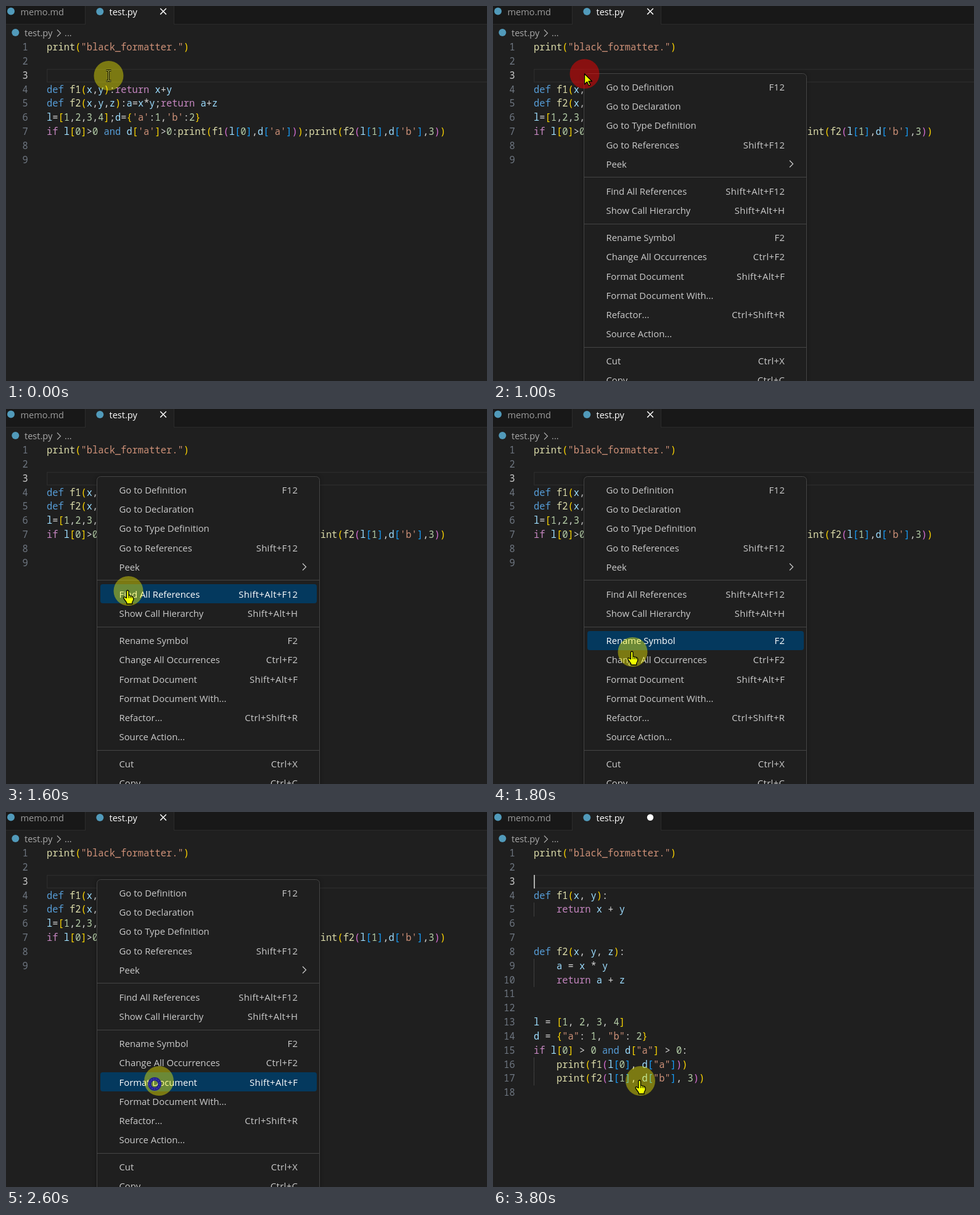
Animation, 780 px wide and 608 px high, one loop 4200 ms. Source, as an HTML page:

```html
<!DOCTYPE html>
<html lang="en">
<head>
<meta charset="utf-8">
<title>Formatting code from the context menu</title>
<style>
html, body { margin: 0; width: 100%; height: 100%; overflow: hidden; background: #1f1f1f; }
svg { display: block; }
text { white-space: pre; }
.ui { font: 14.6px "Open Sans", "Noto Sans", sans-serif; }
.menu .ui { font-size: 14.85px; }
.menu .keys { letter-spacing: .36px; }
.code { font: 15.405px "Noto Sans Mono", "DejaVu Sans Mono", monospace; font-variant-ligatures: none; }
</style>
</head>
<body>
<svg id="stage" width="780" height="608" viewBox="0 0 780 608"></svg>
<script>
const LOOP = 4200;
const CHAR = 9.243;
const LINE = 22.82;
const LEFT = 66;
const baseline = n => 72.2 + (n - 1) * LINE;

const RAW = `print("black_formatter.")


def f1(x,y):return x+y
def f2(x,y,z):a=x*y;return a+z
l=[1,2,3,4];d={'a':1,'b':2}
if l[0]>0 and d['a']>0:print(f1(l[0],d['a']));print(f2(l[1],d['b'],3))

`;
const TIDY = `print("black_formatter.")


def f1(x, y):
    return x + y


def f2(x, y, z):
    a = x * y
    return a + z


l = [1, 2, 3, 4]
d = {"a": 1, "b": 2}
if l[0] > 0 and d["a"] > 0:
    print(f1(l[0], d["a"]))
    print(f2(l[1], d["b"], 3))
`;

// label, shortcut, row centre
const ITEMS = [
  ["Go to Definition", "F12", 131],
  ["Go to Declaration", "", 162],
  ["Go to Type Definition", "", 193.5],
  ["Go to References", "Shift+F12", 225],
  ["Peek", "", 256],
  ["Find All References", "Shift+Alt+F12", 300],
  ["Show Call Hierarchy", "Shift+Alt+H", 331],
  ["Rename Symbol", "F2", 375.5],
  ["Change All Occurrences", "Ctrl+F2", 406.5],
  ["Format Document", "Shift+Alt+F", 438],
  ["Format Document With...", "", 469],
  ["Refactor...", "Ctrl+Shift+R", 500],
  ["Source Action...", "", 531.5],
  ["Cut", "Ctrl+X", 575.5],
  ["Copy", "Ctrl+C", 606.5]
];

const HALO = {
  idle: "rgba(255,250,0,.41)",
  left: "rgba(255,155,0,.49)",
  right: "rgba(255,0,0,.47)"
};

// start, x, y, halo, pointer, highlighted row
const STEPS = [
  [0, 166.5, 113, "idle", "beam", -1],
  [200, 148.5, 111.5, "idle", "beam", -1],
  [400, 148.5, 110, "idle", "beam", -1],
  [800, 148.5, 110, "idle", "busy", -1],
  [1000, 148.5, 110, "right", "arrow", -1],
  [1200, 148.5, 110, "idle", "arrow", -1],
  [1400, 198.5, 270, "idle", "hand", 3],
  [1600, 198.5, 295, "idle", "hand", 5],
  [1800, 226.5, 394, "idle", "hand", 7],
  [2000, 238.5, 423, "idle", "hand", 9],
  [2200, 248, 436, "idle", "hand", 9],
  [2600, 248, 436, "idle", "wait", 9],
  [2800, 239, 436, "left", "hand", -1],
  [3000, 239, 436, "idle", "hand", -1]
];
const MENU = [1000, 2800];
const CARET = [[600, 800], [2800, 3200], [3800, LOOP]];

const stage = document.getElementById("stage");

function add(parent, tag, attrs = {}, text) {
  const el = document.createElementNS("http://www.w3.org/2000/svg", tag);
  for (const key in attrs) el.setAttribute(key, attrs[key]);
  if (text !== undefined) el.textContent = text;
  parent.appendChild(el);
  return el;
}
const group = (parent, attrs) => add(parent, "g", attrs);
const box = (parent, x, y, width, height, fill, rx = 0) =>
  add(parent, "rect", { x, y, width, height, fill, rx });
const label = (parent, x, y, text, fill) =>
  add(parent, "text", { x, y, fill, class: "ui" }, text);
const dot = (parent, cx, cy, r, fill) => add(parent, "circle", { cx, cy, r, fill });
const stroke = (parent, d, color, width = 1) =>
  add(parent, "path", { d, fill: "none", stroke: color, "stroke-width": width });
const show = (el, on) => el.setAttribute("visibility", on ? "visible" : "hidden");
const within = (t, [from, to]) => t >= from && t < to;

function tokens(line) {
  const levels = ["#ffd700", "#da70d6", "#179fff"];
  const parts = line.match(/"[^"]*"|'[^']*'|\w+|\s+|./g) || [];
  let depth = 0;
  return parts.map((part, i) => {
    let color = "#d4d4d4";
    if (/^["']/.test(part)) color = "#ce9178";
    else if (/^[([{]$/.test(part)) color = levels[depth++ % 3];
    else if (/^[)\]}]$/.test(part)) color = levels[--depth % 3];
    else if (/^(def|and)$/.test(part)) color = "#569cd6";
    else if (/^(return|if)$/.test(part)) color = "#c586c0";
    else if (/^\d/.test(part)) color = "#b5cea8";
    else if (/^\w/.test(part)) color = parts[i + 1] === "(" ? "#dcdcaa" : "#9cdcfe";
    return [part, color];
  });
}

function drawCode(source) {
  const g = group(stage, { class: "code" });
  source.split("\n").forEach((line, i) => {
    const n = i + 1;
    const y = baseline(n);
    add(g, "text", {
      x: 35.7, y, "text-anchor": "end", fill: n === 3 ? "#cccccc" : "#6e7681"
    }, n);
    if (line.startsWith("    ")) box(g, LEFT, y - 16.7, 1, LINE, "#404040");
    let col = 0;
    for (const [part, fill] of tokens(line)) {
      if (part.trim()) add(g, "text", { x: LEFT + col * CHAR, y, fill }, part);
      col += part.length;
    }
  });
  return g;
}

function drawFrame() {
  box(stage, 0, 0, 780, 608, "#1f1f1f");
  box(stage, 0, 0, 780, 29, "#181818");
  box(stage, 0, 29, 780, 1, "#2b2b2b");
  box(stage, 128, 0, 145, 30, "#2b2b2b");
  box(stage, 129, 0, 143, 30, "#1f1f1f");
  dot(stage, 8, 8.5, 6, "#519aba");
  label(stage, 23.5, 15, "memo.md", "#9d9d9d");
  dot(stage, 152.3, 9, 6, "#519aba");
  label(stage, 167.5, 15, "test.py", "#ffffff");
  dot(stage, 15.3, 43, 6, "#519aba");
  label(stage, 30, 49, "test.py", "#a9a9a9");
  stroke(stage, "M83 38.5l5.5 5.5-5.5 5.5", "#a9a9a9", 1.2);
  label(stage, 95, 49, "...", "#a9a9a9");
  add(stage, "rect", {
    x: 66.7, y: 102.7, width: 730, height: 20.6,
    fill: "none", stroke: "#2a2a2a", "stroke-width": 1.5
  });
}

function drawMenu() {
  const g = group(stage, {
    class: "menu", style: "filter: drop-shadow(0 0 3px rgba(0,0,0,.36))"
  });
  add(g, "rect", {
    x: 147.5, y: 109.5, width: 361, height: 540, rx: 6, fill: "#1f1f1f", stroke: "#454545"
  });
  for (const y of [277, 353, 553]) box(g, 148, y, 360, 1, "#454545");
  const bar = box(g, 153, 0, 351, 31, "#04395e", 4);
  const rows = ITEMS.map(([name, keys, y]) => {
    const row = group(g, {});
    label(row, 183.5, y + 5.8, name, "inherit");
    add(row, "text", {
      x: 473.3, y: y + 5.8, fill: "inherit", "text-anchor": "end", class: "ui keys"
    }, keys);
    return row;
  });
  stroke(g, "M481 250.5l5.5 5.5-5.5 5.5", "#cccccc", 1.2);
  return { g, bar, rows };
}

function drawBeam(parent) {
  const d = "M-4-8.5h2.5q1.5 0 1.5 1.5 0-1.5 1.5-1.5h2.5M0-7V7M-4 8.5h2.5q1.5 0 1.5-1.5 0 1.5 1.5 1.5h2.5";
  stroke(parent, d, "#000", 3);
  stroke(parent, d, "#d8dc50", 1);
}

function drawRing(parent) {
  add(parent, "circle", { r: 8.2, fill: "none", stroke: "#23238f", "stroke-width": 5.5 });
  add(parent, "circle", {
    r: 8.2, fill: "none", stroke: "#4a4ab4", "stroke-width": 1.2, "stroke-dasharray": "2 2"
  });
}

function drawPointers(parent) {
  const shapes = {};
  for (const name of ["beam", "busy", "arrow", "hand", "wait"]) shapes[name] = group(parent, {});
  const solid = (g, d) => add(g, "path", {
    d, fill: "#f0ff00", stroke: "#000", "stroke-width": 1.3, "stroke-linejoin": "round"
  });
  drawBeam(shapes.beam);
  drawRing(shapes.busy);
  drawBeam(shapes.busy);
  solid(shapes.arrow, "M0 0V17l4-4 3 6 2.5-1-3-6h5.5z");
  const hand = group(shapes.hand, { transform: "translate(-1.3 0)" });
  solid(hand, "M-1.8 11.5V.8a1.8 1.8 0 0 1 3.6 0V7l5.2 1.5q2.5.8 2.5 3v3l-2 4v2.5h-9v-2l-4.6-6.5q-1.4-3 1.2-2.8z");
  stroke(hand, "M1.8 7v4.5M4.5 8v3.5M7 8.7v3", "#000", 1);
  drawRing(group(shapes.wait, { transform: "translate(-7 5)" }));
  return shapes;
}

drawFrame();
const raw = drawCode(RAW);
const tidy = drawCode(TIDY);
const close = stroke(stage, "M250.2 4l9.6 9.6M259.8 4l-9.6 9.6", "#ffffff", 1.5);
const unsaved = dot(stage, 255, 8.7, 5.2, "#ffffff");
const caret = box(stage, 66, 102, 2, 22, "#aeafad");
const menu = drawMenu();
const mouse = group(stage, {});
const halo = dot(mouse, 0, 0, 24);
const pointers = drawPointers(mouse);

function draw(t) {
  const [, x, y, tint, pointer, active] = STEPS.filter(step => step[0] <= t).pop();
  const done = t >= MENU[1];
  show(raw, !done);
  show(tidy, done);
  show(close, !done);
  show(unsaved, done);
  show(caret, CARET.some(span => within(t, span)));

  show(menu.g, within(t, MENU));
  menu.bar.setAttribute("opacity", active < 0 ? 0 : 1);
  if (active >= 0) menu.bar.setAttribute("y", Math.round(ITEMS[active][2] - 16));
  menu.rows.forEach((row, i) => row.setAttribute("fill", i === active ? "#ffffff" : "#cccccc"));

  mouse.setAttribute("transform", `translate(${x} ${y})`);
  halo.setAttribute("fill", HALO[tint]);
  for (const name in pointers) show(pointers[name], name === pointer);
}

const start = performance.now();
function tick() {
  draw((performance.now() - start) % LOOP);
  requestAnimationFrame(tick);
}
tick();
</script>
</body>
</html>
```
